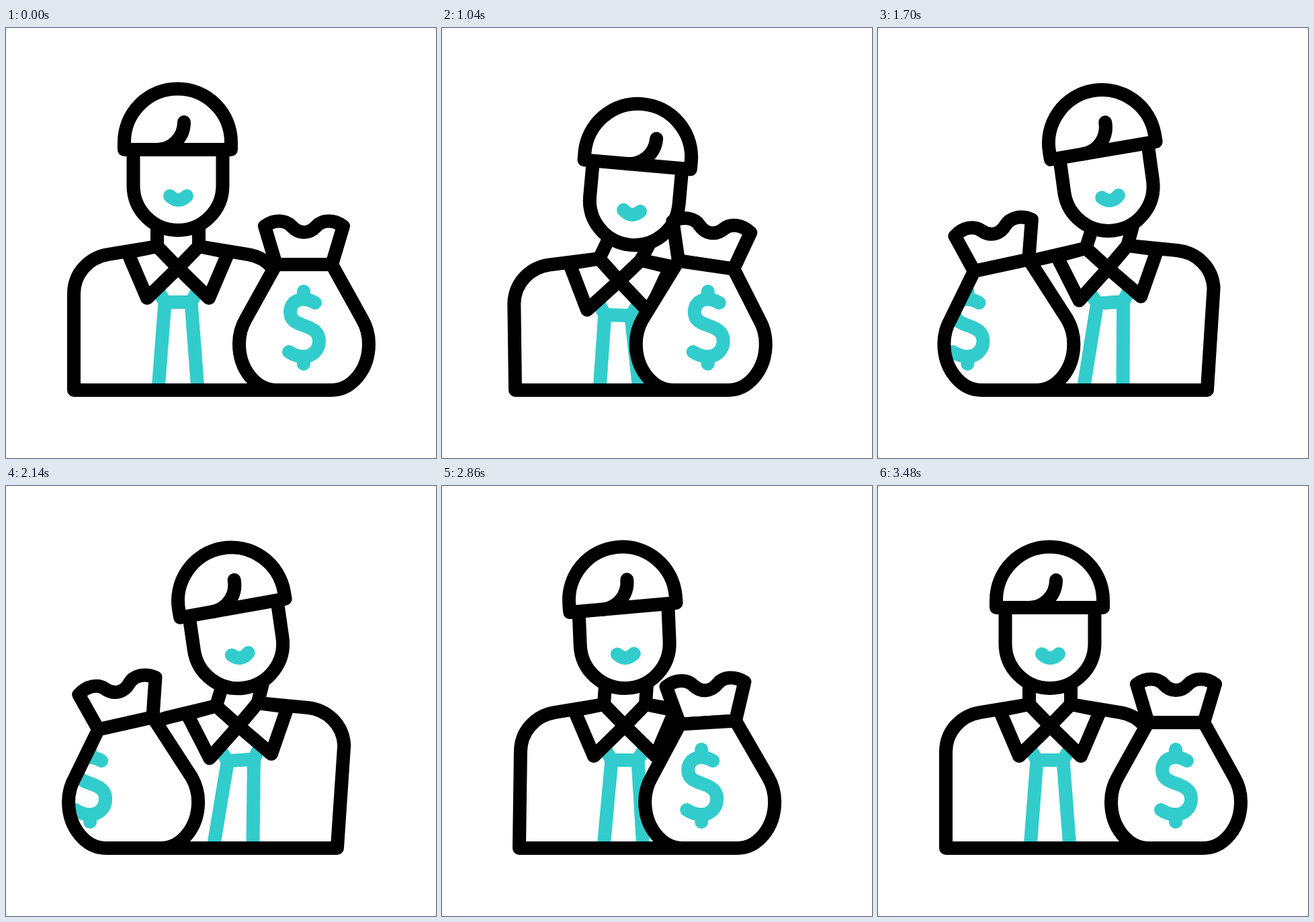
These frames come from a looping animation (640x640 px, 3.6 s). An HTML page with a canvas:

```html
<!DOCTYPE html>
<html lang="en">
<head>
<meta charset="utf-8">
<style>
html, body { margin: 0; width: 100%; height: 100%; overflow: hidden; background: #fff; }
canvas { display: block; }
</style>
</head>
<body>
<canvas id="stage" width="640" height="640"></canvas>
<script>
const ctx = document.getElementById('stage').getContext('2d');
const LOOP = 3600, INK = '#000', TEAL = '#33cccc';

const times = [0, 440, 700, 1040, 1200, 1360, 1620, 2200, 2500, 2860, 3240, 3480];
const tracks = {
  bagX:     [0, -4, -13, -58, -148, -225, -247, -254, -195, -45, -3, 0],
  bagTilt:  [0, 10, 10, 8.4, 0, -9, -12, -12.7, -9.5, -3.5, -0.4, 0],
  signX:    [0, 19, 18, 11, -15, -44, -60, -64, -45, -12, -1, 0],
  baseX:    [0, 0, 1, 8, 32, 62, 78, 82, 63, 14, 1, 0],
  chestX:   [0, -3, -3, -2, 3, 7.5, 10, 11, 8, 2, 0, 0],
  chestTilt:[0, 2.5, 2.5, 2.2, 0, -2.3, -3.6, -4, -2.5, 0, 0, 0],
  crouch:   [0, 1, 1, 0.97, 0.65, 0.25, 0.04, 0, 0, 0, 0, 0],
  hatTilt:  [0, 6.5, 6.2, 5, 0, -6.2, -9.5, -10.1, -9, -5.1, -0.8, 0],
  faceTilt: [0, 6, 6, 5.2, 0.5, -5, -7.7, -8.2, -6, -2.4, -0.3, 0]
};

// Monotone cubic interpolation: smooth, no overshoot.
function sample(values, t) {
  const last = times.length - 1;
  if (t >= times[last]) return values[last];
  let i = 0;
  while (t >= times[i + 1]) i++;
  const rate = j => (values[j + 1] - values[j]) / (times[j + 1] - times[j]);
  const slope = j => {
    if (j === 0 || j === last) return 0;
    const a = rate(j - 1), b = rate(j);
    return a * b <= 0 ? 0 : 2 * a * b / (a + b);
  };
  const h = times[i + 1] - times[i], u = (t - times[i]) / h, v = 1 - u;
  return v * v * ((1 + 2 * u) * values[i] + u * h * slope(i)) +
         u * u * ((3 - 2 * u) * values[i + 1] - v * h * slope(i + 1));
}

// Places a part: turned about (px, py) and moved by (dx, dy).
function place(dx, dy, degrees = 0, px = 0, py = 0) {
  ctx.setTransform(1, 0, 0, 1, px + dx, py + dy);
  ctx.rotate(degrees * Math.PI / 180);
  ctx.translate(-px, -py);
}

function line(...points) {
  points.forEach(([x, y], i) => i ? ctx.lineTo(x, y) : ctx.moveTo(x, y));
}

function paint(color, filled) {
  if (filled) {
    ctx.fillStyle = '#fff';
    ctx.fill();
  }
  ctx.strokeStyle = color;
  ctx.stroke();
}

function drawBody(p, base, chest) {
  ctx.beginPath();
  for (const m of [-1, 1]) {
    const x = d => 256 + m * d;
    chest();
    ctx.moveTo(x(30), 390);
    ctx.lineTo(x(19.5), 408);
    base();
    ctx.lineTo(x(29.5), 539);
  }
  chest();
  line([237, 408], [276, 408]);
  paint(TEAL);

  ctx.beginPath();
  for (const m of [-1, 1]) {
    const x = d => 256 + m * d;
    base();
    line([256, 539], [x(155), 539]);
    chest();
    ctx.lineTo(x(155), 396);
    ctx.bezierCurveTo(x(155), 366, x(134), 342, x(104), 337);
    ctx.lineTo(x(31), 325);
  }
  paint(INK);

  chest();
  for (const m of [-1, 1]) {
    const x = d => 256 + m * d;
    ctx.beginPath();
    line([x(31), 325], [256, 357], [x(46), 402], [x(75), 334]);
    ctx.closePath();
    paint(INK, true);
  }
}

function drawHead(p, chest, face, hat) {
  ctx.beginPath();
  for (const x of [225, 287]) {
    chest();
    ctx.moveTo(x, 325);
    face();
    ctx.lineTo(x, 290);
  }
  paint(INK);

  face();
  ctx.beginPath();
  ctx.moveTo(189.5, 181);
  ctx.lineTo(189.5, 234.5);
  ctx.arc(256, 234.5, 66.5, Math.PI, 0, true);
  ctx.lineTo(322.5, 181);
  paint(INK, true);

  const mouth = 256.5 - 3 * p.crouch;
  ctx.beginPath();
  ctx.moveTo(mouth - 12.5, 250);
  ctx.quadraticCurveTo(mouth, 262, mouth + 12.5, 250);
  paint(TEAL);

  hat();
  ctx.beginPath();
  ctx.moveTo(176, 181);
  ctx.lineTo(176, 170);
  ctx.arc(255.5, 170, 79.5, Math.PI, 0);
  ctx.lineTo(335, 181);
  ctx.closePath();
  paint(INK, true);

  const curl = 16 * p.crouch;
  ctx.beginPath();
  ctx.moveTo(265 + curl, 140);
  ctx.bezierCurveTo(265 + curl, 163, 247 + curl, 181, 225 + curl, 181);
  paint(INK);
}

function drawBag(p) {
  const bottom = () => place(p.bagX, 0);
  const top = () => place(p.bagX, 0, p.bagTilt, 443.5, 405);

  top();
  ctx.beginPath();
  line([402, 352], [385, 295]);
  ctx.bezierCurveTo(400, 284, 417, 286, 425, 295);
  ctx.bezierCurveTo(436, 307, 451, 307, 462, 295);
  ctx.bezierCurveTo(470, 286, 487, 284, 502, 295);
  ctx.lineTo(485, 352);
  ctx.closePath();
  paint(INK, true);

  const sack = () => {
    ctx.beginPath();
    top();
    ctx.moveTo(485, 352);
    ctx.lineTo(402, 352);
    bottom();
    ctx.lineTo(357, 433);
    ctx.bezierCurveTo(350, 445, 347, 457, 347, 470);
    ctx.bezierCurveTo(347, 508, 372, 539, 403, 539);
    ctx.lineTo(484, 539);
    ctx.bezierCurveTo(515, 539, 540, 508, 540, 470);
    ctx.bezierCurveTo(540, 457, 537, 445, 530, 433);
    ctx.closePath();
  };
  sack();
  ctx.fillStyle = '#fff';
  ctx.fill();
  ctx.save();
  ctx.clip();
  place(p.bagX + p.signX, 0);
  ctx.beginPath();
  ctx.moveTo(460, 409);
  ctx.bezierCurveTo(440, 398, 423, 406, 423, 423);
  ctx.bezierCurveTo(423, 437, 436, 440, 444, 443);
  ctx.bezierCurveTo(458, 448, 466, 453, 466, 466);
  ctx.bezierCurveTo(466, 480, 455, 489, 443, 489);
  ctx.bezierCurveTo(434, 489, 427, 486, 421, 482);
  line([443, 392], [443, 403]);
  line([443, 489], [443, 500]);
  paint(TEAL);
  ctx.restore();
  sack();
  paint(INK);
}

function draw(t) {
  const p = {};
  for (const name in tracks) p[name] = sample(tracks[name], t);
  const headX = p.baseX + 28 * p.crouch, headY = 23 * p.crouch + Math.max(0, -p.chestTilt) * 0.2;
  const base = () => place(p.baseX, 0);
  const chest = () => place(p.baseX + p.chestX, 20 * p.crouch, p.chestTilt, 256, 400);
  const face = () => place(headX, headY, p.faceTilt, 255.5, 181);
  const hat = () => place(headX, headY, p.hatTilt, 255.5, 181);

  ctx.setTransform(1, 0, 0, 1, 0, 0);
  ctx.fillStyle = '#fff';
  ctx.fillRect(0, 0, 640, 640);
  ctx.lineWidth = 20;
  ctx.lineCap = ctx.lineJoin = 'round';
  drawBody(p, base, chest);
  drawHead(p, chest, face, hat);
  drawBag(p);
}

const start = performance.now();
function tick() {
  draw((performance.now() - start) % LOOP);
  requestAnimationFrame(tick);
}
tick();
</script>
</body>
</html>
```
